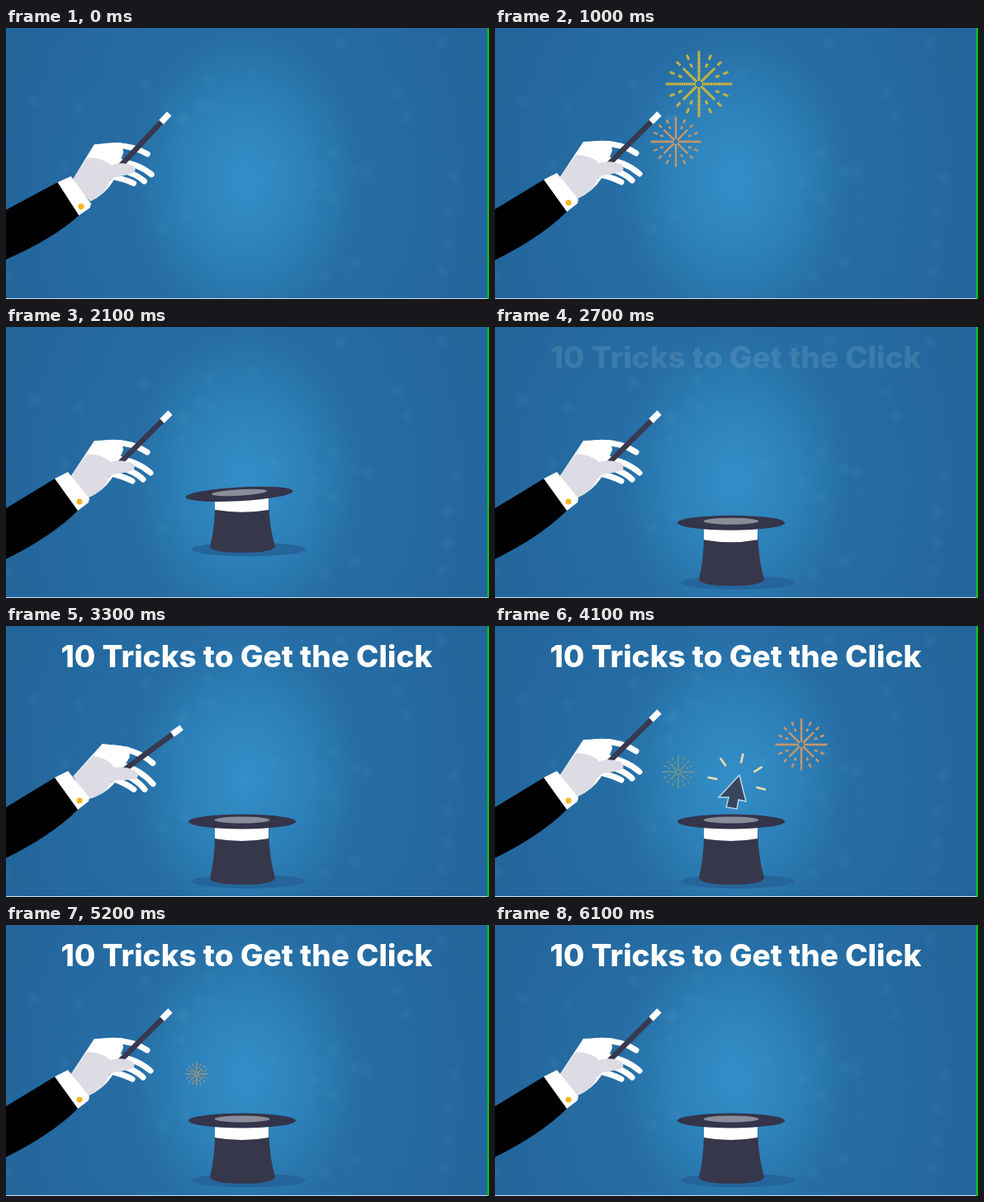
Animation, 585 px wide and 329 px high, one loop 6.2 s. Source, as an HTML page:

```html
<!DOCTYPE html>
<html lang="en">
<head>
<meta charset="utf-8">
<title>10 Tricks to Get the Click</title>
<style>
  html, body { margin: 0; width: 100%; height: 100%; overflow: hidden; background: #23679d; }
  svg { display: block; width: 585px; height: 329px; }
  #title { font: 800 37px Inter, sans-serif; fill: #fff; text-anchor: middle; }
  #fingers { fill: none; stroke: #fff; stroke-width: 7; stroke-linecap: round; }
</style>
</head>
<body>
<svg viewBox="0 0 585 329">
  <defs>
    <radialGradient id="glow" gradientUnits="userSpaceOnUse" cx="0" cy="0" r="1"
      gradientTransform="translate(290 185) scale(290 370)">
      <stop offset="0" stop-color="#348fc8"/>
      <stop offset=".25" stop-color="#2d81b9"/>
      <stop offset=".47" stop-color="#266ea5"/>
      <stop offset="1" stop-color="#23669c"/>
    </radialGradient>
    <radialGradient id="soft">
      <stop offset="0" stop-color="#5aa6d4" stop-opacity=".12"/>
      <stop offset="1" stop-color="#5aa6d4" stop-opacity="0"/>
    </radialGradient>
    <clipPath id="aboveHat"><rect x="200" width="200" height="236"/></clipPath>
  </defs>

  <rect width="585" height="329" fill="url(#glow)"/>
  <g id="dots" fill="url(#soft)"></g>

  <g id="hat">
    <ellipse cx="294" cy="310" rx="69" ry="8.5" fill="#25659b"/>
    <g id="hatBody">
      <path d="M253 240Q254 278 247 306 249 314 286 314T326 306Q318 278 318 240Z" fill="#37374b"/>
      <path d="M253 242H318V258Q286 264 253 258Z" fill="#fff"/>
      <g id="rim">
        <ellipse cx="286" cy="237.5" rx="65" ry="9" fill="#34344a"/>
        <ellipse cx="286" cy="235.5" rx="33.5" ry="4" fill="#8c8c98"/>
      </g>
    </g>
  </g>

  <g clip-path="url(#aboveHat)">
    <path id="arrow" d="M296 181 304 213 295 211 293 222 280 220 283 208 271 208Z"
      fill="#36465c" stroke="#b5d8ea" stroke-width="1.5"/>
  </g>
  <g id="sparkle" stroke="#e6dcae" stroke-width="2.7"></g>

  <g id="arm">
    <g id="hand">
      <path d="M78 182 107 138 140 137 142 149 128 184Q118 199 100 207Z" fill="#fff"/>
      <g id="fingers">
        <path d="M112 142Q146 136 171 152"/>
        <path d="M135 160Q158 162 175 177"/>
        <path d="M130 168Q155 174 166 185"/>
        <path d="M122 177Q142 181 153 187"/>
      </g>
      <path d="M122 181 190 113" stroke="#38384e" stroke-width="6.5"/>
      <path d="M189 114 199 104" stroke="#fff" stroke-width="7.5"/>
      <path d="M78 182 98 154Q116 154 126 164 140 160 152 165 158 169 154 174 140 178 130 179L124 183Q120 198 100 207Z" fill="#dddce4"/>
    </g>
    <path d="M-20 232 61 183 88 222Q50 260-20 291Z"/>
    <path d="M59 184 75 176 101 208 100 213 87 223Z" fill="#fff"/>
    <circle cx="89" cy="212" r="3.5" fill="#f5b51b"/>
  </g>

  <g id="fireworks"></g>
  <text id="title" x="291.5" y="50">10 Tricks to Get the Click</text>
  <path d="M0 328.5H583" stroke="#cfe2ee"/>
  <path d="M584 0V329" stroke="#08c810" stroke-width="2"/>
</svg>

<script>
const LOOP = 6200, STEP = 100;
const $ = id => document.getElementById(id);

function add(parent, tag, attrs) {
  const el = document.createElementNS('http://www.w3.org/2000/svg', tag);
  for (const key in attrs) el.setAttribute(key, attrs[key]);
  return parent.appendChild(el);
}

// Smooth step from 0 to 1, and a smooth rise and fall.
function ease(t, from, to) {
  const u = Math.min(1, Math.max(0, (t - from) / (to - from)));
  return u * u * (3 - 2 * u);
}
function bump(t, from, to) {
  const mid = (from + to) / 2;
  return ease(t, from, mid) - ease(t, mid, to);
}
const spring = age => age > 0 ? 1 - Math.exp(-age / 110) * Math.cos(age / 120) : 0;

// Radial dash at an angle in degrees.
function ray(angle, inner, outer) {
  const c = Math.cos(angle * Math.PI / 180), s = Math.sin(angle * Math.PI / 180);
  return `M${c * inner} ${s * inner}L${c * outer} ${s * outer}`;
}

let seed = 7;
const random = () => (seed = seed * 16807 % 2147483647) / 2147483647;
for (let i = 0; i < 30; i++)
  add($('dots'), 'circle', { cx: random() * 580, cy: random() * 325, r: 10 });

for (let i = 0; i < 5; i++)
  add($('sparkle'), 'path', { d: ray(-170 + 46 * i, 24, 36), transform: 'translate(293 190)' });

// Long rays on the axes, shorter diagonals, broken rays between.
let burstShape = '';
for (let i = 0; i < 16; i++) {
  const a = i * 22.5;
  if (i % 4 == 0) burstShape += ray(a, 4, 40);
  else if (i % 2 == 0) burstShape += ray(a, 4, 27) + ray(a, 32, 38);
  else burstShape += ray(a, 22, 27) + ray(a, 32, 38);
}

const YELLOW = '#d8c534', ORANGE = '#e5a06a', GREEN = '#8cae6c';
const bursts = [
  [247, 68, 41, 400, YELLOW], [219, 138, 34, 650, ORANGE],
  [222, 177, 20, 3400, GREEN], [371, 144, 34, 3700, ORANGE],
  [231, 181, 30, 5100, ORANGE], [350, 86, 40, 5200, YELLOW]
].map(([x, y, r, start, color]) => {
  const el = add($('fireworks'), 'g', { 'stroke-width': 3 });
  add(el, 'path', { d: burstShape, stroke: '#7f8472' });
  add(el, 'path', { d: burstShape, stroke: color, 'stroke-dasharray': '1.7 .8' });
  return { x, y, r, start, el };
});

const move = (id, value) => $(id).setAttribute('transform', value);
const show = (el, opacity) => el.setAttribute('opacity', opacity);

function draw(t) {
  const flick = bump(t, 0, 500) + bump(t, 3000, 3600);
  const lowered = 1 - ease(t, 0, 300);
  move('arm', `rotate(${3 * lowered} 0 250)`);
  move('hand', `rotate(${8.6 * flick - 5 * lowered} 78 205)`);

  const hatY = -330 + 290 * ease(t, 1600, 2000) + 40 * spring(t - 2200);
  const tilt = bump(t, 1800, 2400);
  move('hat', `translate(0 ${hatY})`);
  move('hatBody', `translate(0 ${22 * tilt}) scale(1 ${1 - .07 * tilt})`);
  move('rim', `translate(${-3.5 * tilt} 0) rotate(${-3.5 * tilt} 286 237)`);

  const lift = ease(t, 3650, 3950) - ease(t, 4550, 4850);
  move('arrow', `translate(0 ${62 * (1 - lift)})`);
  show($('sparkle'), ease(t, 3900, 4050) - ease(t, 4400, 4550));
  show($('title'), ease(t, 2600, 3100));

  for (const b of bursts) {
    const age = Math.max(0, t - b.start);
    const scale = b.r / 40 * (1 - Math.exp(-age / 155));
    show(b.el, age ? 1 - ease(age, 600, 900) : 0);
    b.el.setAttribute('transform', `translate(${b.x} ${b.y}) scale(${scale})`);
  }
}

const begin = performance.now();
function frame() {
  const t = (performance.now() - begin) % LOOP;
  draw(Math.floor(t / STEP) * STEP);
  requestAnimationFrame(frame);
}
frame();
</script>
</body>
</html>
```
